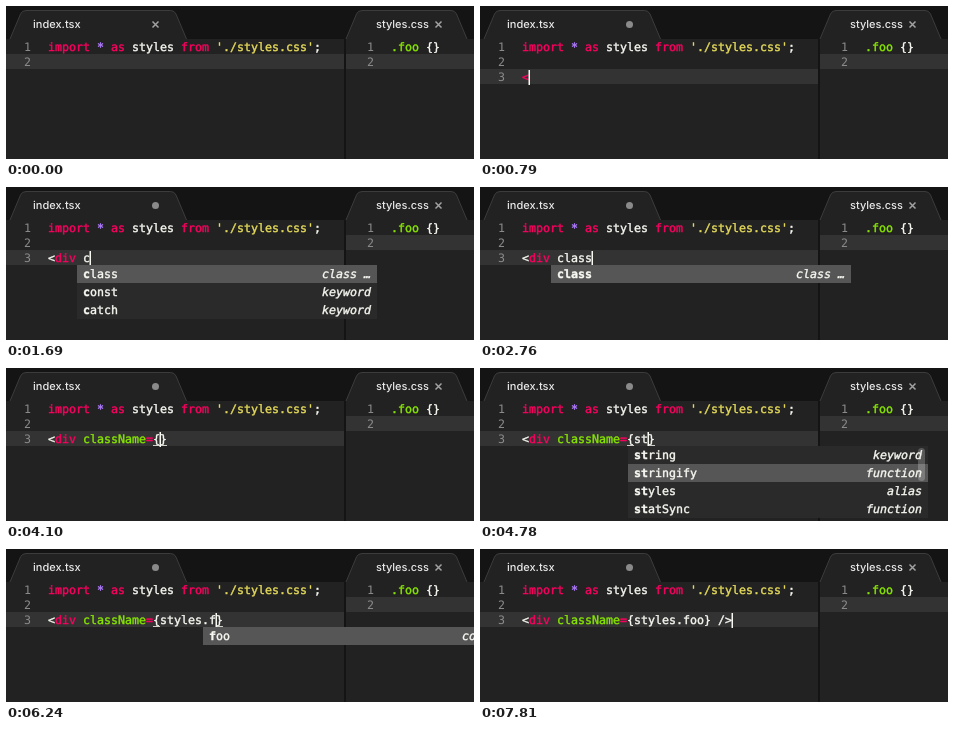
These frames come from a looping animation (468x153 px, 8000 ms). An HTML page:

```html
<!DOCTYPE html>
<html lang="en">
<head>
<meta charset="utf-8">
<title>Editor typing</title>
<style>
  html, body { margin: 0; width: 100%; height: 100%; overflow: hidden; background: #141414; }
  svg { display: block; width: 468px; height: 153px; }
  text { white-space: pre; text-rendering: geometricPrecision; font: 11.63px "DejaVu Sans Mono", monospace; stroke-width: .4px; }
  .tab { font: 500 11px Inter, sans-serif; fill: #e8e8e8; }
  .kind { font-style: italic; text-anchor: end; }
</style>
</head>
<body>
<svg id="stage" viewBox="0 0 468 153"></svg>
<script>
const LOOP = 8000, CW = 7, X0 = 42;
const PINK = '#f9005f', GREEN = '#87e600', YELLOW = '#e6db5a', PURPLE = '#b07cff',
      WHITE = '#f8f8f2', GRAY = '#8c8c8c';

// [time, text inserted at the caret]
const keys = [
  [790, '<'], [1000, 'd'], [1120, 'i'], [1210, 'v'], [1370, ' '],
  [1550, 'c'], [1700, 'l'], [1810, 'a'], [2010, 's'], [2760, 's'],
  [3060, 'N'], [3380, 'a'], [3500, 'm'], [3620, 'e'], [3830, '='], [4100, '{'],
  [4490, 's'], [4780, 't'], [4950, 'y'], [5100, 'l'], [5250, 'e'], [5460, 's'],
  [5760, '.'], [6120, 'f'], [6630, 'oo'], [7150, '}'], [7390, ' '], [7600, '/'], [7810, '>']
];
const ENTER = 440;

// Completion lists: [from, to, column, selected row, rows, fade-out]; *...* marks matched letters
const POP_Y = 78, POP_W = 300, ROW = 18, MAX_ROWS = 4;
const popups = [
  [1040, 1160, 1, 0, ['*D*ataView|interface', '*D*ate|interface', '*d*ebugger|keyword', '*d*elete|keyword']],
  [1160, 1250, 1, 0, ['*D*ataV*i*ew|interface', 'create*D*ec*i*pher|function', '*di*rname|function']],
  [1250, 1370, 1, 0, ['*D*ata*Vi*ew|interface', 'create*D*ecipher*iv*|function']],
  [1590, 1700, 5, 0, ['*c*lass|class …', '*c*onst|keyword', '*c*atch|keyword']],
  [1700, 1810, 5, 0, ['*cl*ass|class …', '*cl*earTimeout|function']],
  [1810, 2010, 5, 0, ['*cla*ss|class …']],
  [2010, 2760, 5, 0, ['*clas*s|class …']],
  [2760, 3140, 5, 0, ['*class*|class …'], 90],
  [4530, 4780, 16, 0, ['*s*tring|keyword', '*s*uper|keyword', '*s*witch|keyword', '*s*tyles|alias']],
  [4780, 4990, 16, 1, ['*st*ring|keyword', '*st*ringify|function', '*st*yles|alias', '*st*atSync|function']],
  [4990, 5100, 16, 0, ['*sty*les|alias']],
  [5100, 5250, 16, 0, ['*styl*es|alias']],
  [5250, 5460, 16, 0, ['*style*s|alias']],
  [5460, 5760, 16, 0, ['*styles*|alias'], 80],
  [5880, 6160, 23, 0, ['foo|const']],
  [6160, 6630, 23, 0, ['*f*oo|const'], 130]
];

const esc = s => s.replace(/&/g, '&amp;').replace(/</g, '&lt;');
// A thin stroke in the text colour imitates heavier font smoothing
const paint = color => `fill="${color}" stroke="${color}"`;
const span = (color, s) => `<tspan ${paint(color)}>${esc(s)}</tspan>`;
const text = (x, y, body, attrs = '') => `<text x="${x}" y="${y}" ${attrs}>${body}</text>`;
const rect = (x, y, w, h, fill, attrs = '') =>
  `<rect x="${x}" y="${y}" width="${w}" height="${h}" fill="${fill}" ${attrs}/>`;
const lineNo = (x, n) => text(x, 30 + 15 * n, n, `fill="${GRAY}"`);
const ramp = (t, a, b) => Math.min(1, Math.max(0, (t - a) / (b - a)));

const tab = (l, r) =>
  `<path d="M${l} 33L${l + 10.5} 8Q${l + 12} 4.5 ${l + 16} 4.5H${r - 16}Q${r - 12} 4.5 ${r - 10.5} 8L${r} 33" fill="#222" stroke="#3c3c3c"/>`;
const cross = x =>
  `<path d="M${x - 3} 15.5l6 6m0 -6l-6 6" stroke="#a2a2a2" stroke-width="1.5"/>`;

const chrome =
  rect(0, 0, 468, 153, '#141414') + tab(4, 180.5) + tab(340, 461) +
  rect(0, 33, 338, 120, '#222') + rect(340, 33, 128, 120, '#222') +
  rect(340, 48, 128, 15, '#333') +
  text(27, 22, 'index.tsx', 'class="tab"') + text(370, 22, 'styles.css', 'class="tab"') + cross(432.5) +
  lineNo(361, 1) + lineNo(361, 2) +
  text(385, 45, span(GREEN, '.foo') + span(WHITE, ' {}'));

const firstLine = text(X0, 45,
  span(PINK, 'import ') + span(PURPLE, '* ') + span(PINK, 'as ') + span(WHITE, 'styles ') +
  span(PINK, 'from ') + span(YELLOW, "'./styles.css'") + span(WHITE, ';'));

function colorize(code) {
  if (code.length < 5) return span(PINK, code.slice(0, 1)) + span(WHITE, code.slice(1));
  const eq = code.indexOf('=');
  const head = span(WHITE, '<') + span(PINK, 'div');
  if (eq < 0) return head + span(WHITE, code.slice(4));
  return head + span(GREEN, code.slice(4, eq)) + span(PINK, '=') + span(WHITE, code.slice(eq + 1));
}

function drawPopup([from, to, col, sel, rows, fade = 0], t) {
  if (t < from || t >= to + fade) return '';
  const tx = X0 + col * CW, x = tx - 6;
  let out = rect(x, POP_Y, POP_W, rows.length * ROW, '#2a2a2a') +
    rect(x, POP_Y + sel * ROW, POP_W, ROW, '#565656');
  rows.forEach((row, i) => {
    const [name, kind] = row.split('|'), y = POP_Y + 13 + ROW * i;
    const label = name.split('*').map((s, k) =>
      k % 2 ? `<tspan font-weight="bold">${s}</tspan>` : s).join('');
    out += text(tx, y, label, paint(WHITE)) +
      text(x + POP_W - 6, y, kind, `class="kind" ${paint(WHITE)}`);
  });
  if (rows.length === MAX_ROWS) // scroll thumb
    out += rect(x + POP_W - 10, POP_Y + 2, 7, 33, '#fff', 'rx="3.5" opacity=".22"');
  return `<g opacity="${fade ? 1 - ramp(t, to, to + fade) : 1}">${out}</g>`;
}

function caretAlpha(t) {
  if (t < ENTER) return ramp(t, 140, 400);
  return t < 2760 ? 1 - ramp(t, 2440, 2700) : 1;
}

function draw(t) {
  const entered = t >= ENTER;
  const typed = keys.filter(k => k[0] <= t).map(k => k[1]).join('');
  const inBraces = typed.includes('{') && !typed.includes('}');
  const code = typed + (inBraces ? '}' : '');
  const top = entered ? 63 : 48;

  let out = chrome + rect(0, top, 338, 15, '#333');
  out += entered ? '<circle cx="149.5" cy="18.5" r="3.5" fill="#8a8a8a"/>' : cross(149.5);
  out += lineNo(18, 1) + lineNo(18, 2) + firstLine;
  if (entered) out += lineNo(18, 3) + text(X0, 75, colorize(code));

  // Matching bracket underlines
  if (inBraces || typed.endsWith('}'))
    for (const c of '{}') out += rect(X0 + code.indexOf(c) * CW, 77, CW, 1, WHITE, 'opacity=".8"');

  out += rect(X0 + typed.length * CW - 0.5, top + 1, 1.5, 15, WHITE, `opacity="${caretAlpha(t)}"`);
  for (const p of popups) out += drawPopup(p, t);
  return out;
}

const stage = document.getElementById('stage');
const start = performance.now();
let last = '';
function tick() {
  const next = draw((performance.now() - start) % LOOP);
  if (next !== last) stage.innerHTML = last = next;
  requestAnimationFrame(tick);
}
tick();
</script>
</body>
</html>
```
